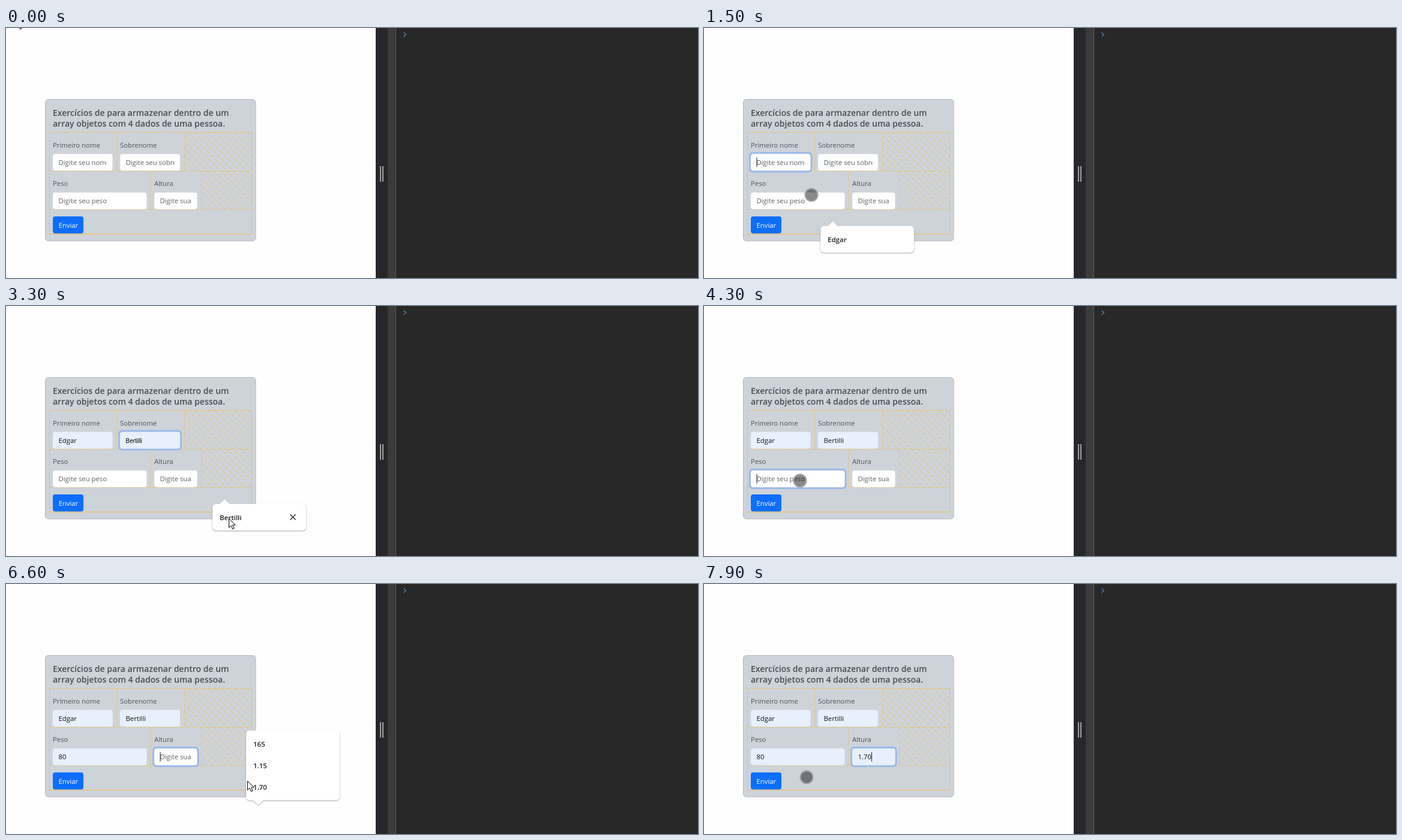
These frames come from a looping animation (1153 px wide and 418 px high, 8 s). An HTML page:

```html
<!DOCTYPE html>
<html lang="pt">
<head>
<meta charset="utf-8">
<title>Formulário</title>
<style>
  html, body { margin: 0; width: 100%; height: 100%; overflow: hidden; background: #fefefe; }
  svg.stage { display: block; width: 100vw; height: 100vh; }
  text { font: 11.3px "Open Sans", "Noto Sans", sans-serif; fill: #4d5257; white-space: pre; }
  .title { font-size: 14px; font-weight: 600; fill: #474c52; }
  .hint { fill: #595f66; }
  .value { fill: #111; }
  .preview { font: 10px "Liberation Sans", Arial, sans-serif; fill: #000; }
  .option { font-size: 11.5px; font-weight: 600; fill: #202124; }
  .flex path { fill: none; stroke: #f2bb45; stroke-width: 1; }
  .popup { filter: drop-shadow(0 1px 1px rgba(0, 0, 0, .35)); }
</style>
</head>
<body>
<svg class="stage" viewBox="0 0 1153 418" preserveAspectRatio="none">
  <defs>
    <clipPath id="gaps"><path d="M297 174H410V303H325V239H297Z"/></clipPath>
  </defs>
  <rect width="1153" height="418" fill="#fefefe"/>

  <rect x="65.5" y="119.5" width="350.5" height="236.5" rx="5" fill="#ced3da" stroke="#b3b8bf"/>
  <text class="title" x="78" y="147">Exercícios de para armazenar dentro de um</text>
  <text class="title" x="78" y="165">array objetos com 4 dados de uma pessoa.</text>
  <g class="flex">
    <path id="hatch" clip-path="url(#gaps)" stroke-dasharray="6 3"/>
    <path d="M72.5 174.5H409.5V345M72.5 174.5V345" stroke-dasharray="4 2"/>
    <path d="M72.5 344.5H410"/>
    <path d="M73 239.5H410M73 303.5H410M184.5 175V239M297.5 175V239M240.5 240V303M325.5 240V303"
          stroke-dasharray="3 2" opacity=".8"/>
  </g>
  <text x="78" y="200">Primeiro nome</text>
  <text x="190" y="200">Sobrenome</text>
  <text x="78" y="264">Peso</text>
  <text x="247" y="264">Altura</text>
  <rect x="78" y="315" width="51" height="28.5" rx="4" fill="#0d6efd"/>
  <text x="87.5" y="334" style="fill:#fff">Enviar</text>
  <g id="fields"></g>

  <rect x="616" width="20" height="418" fill="#26272b"/>
  <rect x="636" width="13" height="418" fill="#3b3b3b"/>
  <rect x="649" width="1" height="418" fill="#5a5b5d"/>
  <rect x="650" width="503" height="418" fill="#282828"/>
  <path d="M624 231V257M628 231V257" stroke="#a0a1a3" stroke-width="2"/>
  <path d="M662.5 7.5L666.5 11L662.5 14.5" fill="none" stroke="#5083b8" stroke-width="1.3"/>

  <g id="popups"></g>
  <g id="touch">
    <circle r="10.5" fill="rgba(0,0,0,.46)"/>
    <circle r="10.5" fill="none" stroke="#a0a2a5" stroke-width="2"/>
  </g>
  <path id="arrow" d="M.5 .5V15.5L4 12.2L6.6 18L9 17L6.5 11.2H11.2Z" fill="#fff" stroke="#000"/>
</svg>
<script>
const LOOP = 8000, STEP = 100, BLINK = 500, NEVER = LOOP + 1;
const $ = id => document.getElementById(id);

function add(parent, tag, attrs, text = '') {
  const node = document.createElementNS('http://www.w3.org/2000/svg', tag);
  for (const name in attrs) node.setAttribute(name, attrs[name]);
  node.textContent = text;
  return parent.appendChild(node);
}
const show = (node, on) => node.setAttribute('visibility', on ? 'visible' : 'hidden');

// Times in ms: focus, blur, popup open, suggestion preview, commit.
const fields = [
  { x: 78, y: 210.5, w: 99.5, hint: 'Digite seu nome', value: 'Edgar', misspelt: true,
    focus: 1100, blur: 2800, open: 1200, preview: 1600, commit: 2000,
    popup: { x: 194, y: 331, options: ['Edgar'] } },
  { x: 190, y: 210.5, w: 100, hint: 'Digite seu sobrenome', value: 'Bertilli',
    focus: 2800, blur: 4300, open: 2900, preview: 3200, commit: 3500,
    popup: { x: 344, y: 331, options: ['Bertilli'] } },
  { x: 78, y: 275, w: 156.5, hint: 'Digite seu peso', value: '80',
    focus: 4300, blur: 6300, preview: 5300, commit: 5600 },
  { x: 247, y: 275, w: 71.5, hint: 'Digite sua altura', value: '1.70',
    focus: 6300, blur: NEVER, open: 6400, preview: 6800, commit: 7500,
    popup: { x: 400, y: 245, options: ['165', '1.15', '1.70'], above: true } },
];

function buildField(f) {
  const { x, y, w } = f, g = $('fields');
  f.ring = add(g, 'rect', { x: x - 3, y: y - 3, width: w + 6, height: 34, rx: 6, fill: '#98b9e9' });
  f.box = add(g, 'rect', { x, y, width: w, height: 28, rx: 4, stroke: '#dfe3e8', 'stroke-width': .6 });
  const inner = add(g, 'svg', { x: x + 9.5, y, width: w - 19, height: 28 });
  const line = (cls, text) => add(inner, 'text', { class: cls, x: 0, y: 18.3 }, text);
  f.hintText = line('hint', f.hint);
  f.previewText = line('preview', f.value);
  f.valueText = line('value', f.value);
  f.caret = add(g, 'rect', { y: y + 6, width: 1, height: 16, fill: '#222' });
  if (f.misspelt) {
    f.wave = add(g, 'path', { d: `M${x + 10} ${y + 21}` + 'l2 -2l2 2'.repeat(8), fill: 'none', stroke: '#e8343c' });
  }
  if (f.popup) buildPopup(f);
}

function buildPopup(f) {
  const { x, y, options, above } = f.popup;
  const height = 8 + 36 * options.length;
  const g = f.popupNode = add($('popups'), 'g', { class: 'popup' });
  add(g, 'rect', { x, y, width: 156, height: height + .5, rx: 6, fill: '#fff' });
  add(g, 'path', { d: `M${x + 11} ${above ? y + height : y + 1}l9.5 ${above ? 8.5 : -9}l9.5 ${above ? -8.5 : 9}Z`, fill: '#fff' });
  options.forEach((text, i) => add(g, 'text', { class: 'option', x: x + 12, y: y + 27 + 36 * i }, text));
  f.close = add(g, 'path', {
    d: `M${x + 129.5} ${y + height - 26.5}l9 9m0 -9l-9 9`, stroke: '#333', 'stroke-width': 1.6,
  });
}

function drawField(f, t) {
  const focused = t >= f.focus && t < f.blur;
  const done = t >= f.commit, previewing = t >= f.preview && !done;
  const caretX = f.x + 9.5 + (done ? f.valueText.getComputedTextLength() : 0);
  const blinkStart = done ? f.commit : f.focus;
  show(f.ring, focused);
  f.box.setAttribute('fill', done || previewing ? '#e8f0fe' : '#fff');
  show(f.hintText, !done && !previewing);
  show(f.previewText, previewing);
  show(f.valueText, done);
  f.caret.setAttribute('x', caretX);
  show(f.caret, focused && Math.floor((t - blinkStart) / BLINK) % 2 === 0);
  if (f.wave) show(f.wave, focused && done);
  if (f.popup) {
    const open = t >= f.open && !done;
    show(f.popupNode, open);
    show(f.close, open && previewing);
  }
}

// [time, x, y, pointer]: a touch circle over the page, an arrow over popups.
const path = [
  [0, 17, -16, 'arrow'], [200, 24, 40], [500, 105, 325], [700, 141, 221], [1300, 141, 221],
  [1500, 179, 279], [1600, 300, 352, 'arrow'], [1900, 306, 350, 'arrow'],
  [2000, 205, 262], [2200, 220, 252], [2300, 224, 242], [2600, 230, 217], [2800, 230, 217],
  [3100, 222, 246], [3200, 376, 344, 'arrow'], [3300, 371, 355, 'arrow'],
  [3500, 210, 266], [3700, 210, 266], [4100, 160, 292], [4500, 160, 292], [4800, 102, 320],
  [5300, 226, 440, 'arrow'], [5600, 102, 318], [6100, 283, 289], [6300, 283, 289],
  [6500, 184, 255], [6600, 402, 329, 'arrow'], [6700, 402, 329, 'arrow'],
  [6800, 412, 336, 'arrow'], [6900, 412, 336, 'arrow'], [7300, 424, 342, 'arrow'],
  [7500, 247, 259], [7900, 171, 323],
];

function drawPointer(t) {
  const i = path.findLastIndex(key => key[0] <= t);
  const [start, x, y, kind] = path[i];
  const next = path[i + 1];
  const k = next && next[3] === kind ? (t - start) / (next[0] - start) : 0;
  const px = k ? x + (next[1] - x) * k : x;
  const py = k ? y + (next[2] - y) * k : y;
  for (const id of ['touch', 'arrow']) {
    $(id).setAttribute('transform', `translate(${px} ${py})`);
    show($(id), id === (kind || 'touch'));
  }
}

let hatch = '';
for (let x = 160; x < 410; x += 11) hatch += `M${x} 174l129 129`;
$('hatch').setAttribute('d', hatch);
fields.forEach(buildField);

function frame() {
  const t = Math.floor(performance.now() % LOOP / STEP) * STEP;
  fields.forEach(f => drawField(f, t));
  drawPointer(t);
  requestAnimationFrame(frame);
}
frame();
</script>
</body>
</html>
```
